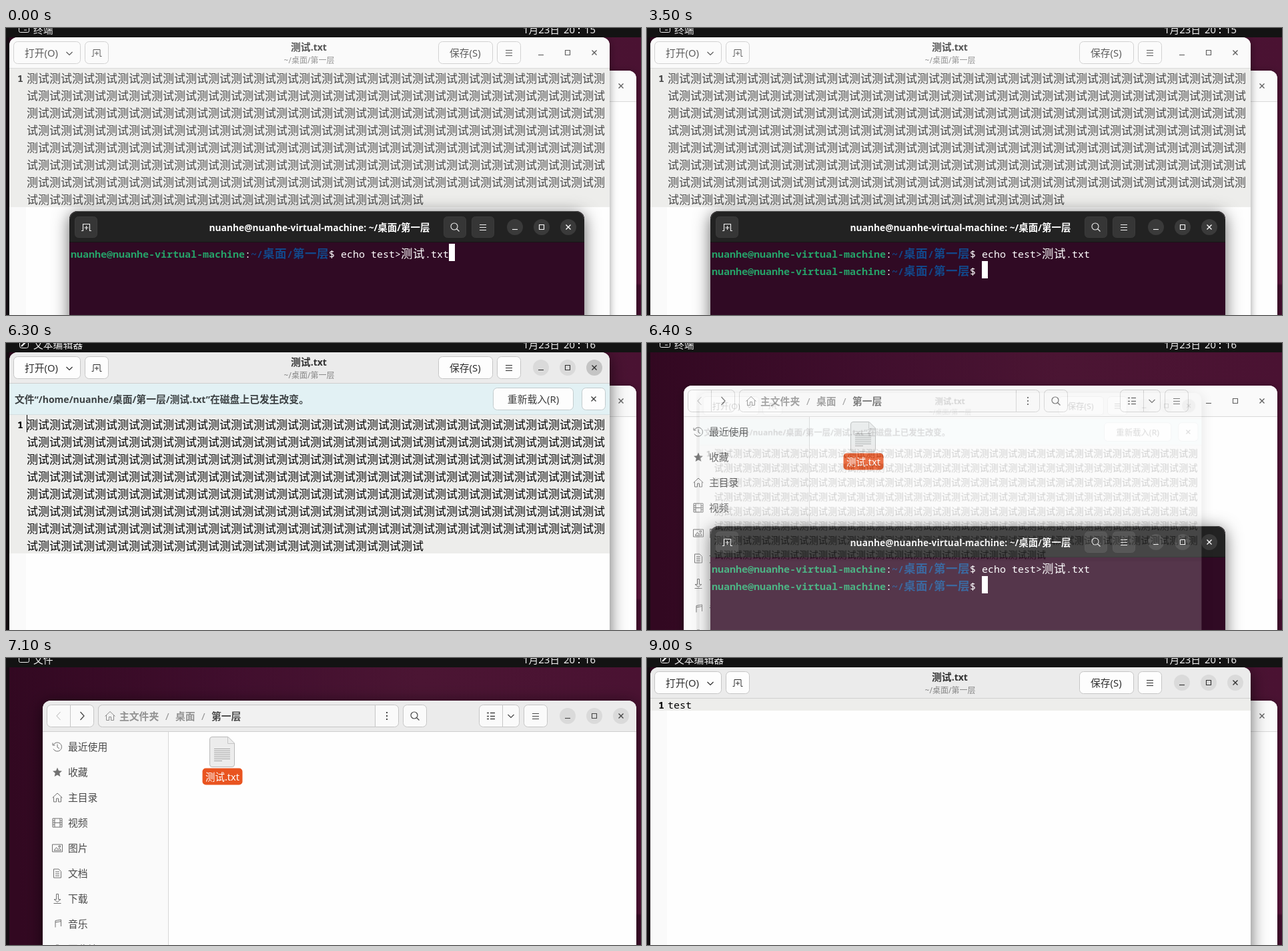
Write an HTML page with a canvas that moves like this. It is 952 by 431 pixels and loops after 9100 ms.

```html
<!DOCTYPE html>
<html lang="zh-CN">
<head>
<meta charset="utf-8">
<style>
html, body { margin: 0; width: 100%; height: 100%; overflow: hidden; background: #131313; }
canvas { display: block; }
</style>
</head>
<body>
<canvas id="stage" width="952" height="431"></canvas>
<script>
const LOOP = 9100;
const UI = 14.8;
const USER = 'nuanhe';
const HOST = USER + '@' + USER + '-virtual-machine';
const SANS = '"Noto Sans", "Noto Sans CJK SC", sans-serif';
const HAN = '"Noto Sans CJK SC", "Noto Sans CJK", sans-serif';
const MONO = '"Noto Sans Mono", "Noto Sans CJK SC", monospace';

const stage = document.getElementById('stage').getContext('2d');
const layer = document.createElement('canvas');
layer.width = 952;
layer.height = 800;
const layerCtx = layer.getContext('2d');
let c = stage;

const clamp = v => Math.max(0, Math.min(1, v));
const grey = v => `rgb(${v},${v},${v})`;
const mix = (a, b, p) => grey(Math.round(a + (b - a) * p));
const isHan = ch => /[\u3000-\u9fff\uff00-\uffef]/.test(ch);

// ---- text ----

function setFont(han, size, bold) {
  const latin = bold ? size * 0.95 : size;
  c.font = `${bold ? 'bold ' : ''}${han ? size : latin}px ${han ? HAN : SANS}`;
}

// Han and Latin runs have slightly different sizes.
function say(str, x, y, color, { size = UI, bold = false, center = false } = {}) {
  const runs = str.match(/[\u3000-\u9fff\uff00-\uffef]+|[^\u3000-\u9fff\uff00-\uffef]+/g);
  const widths = runs.map(r => {
    setFont(isHan(r[0]), size, bold);
    return c.measureText(r).width;
  });
  if (center) x -= widths.reduce((a, b) => a + b, 0) / 2;
  c.fillStyle = color;
  runs.forEach((r, i) => {
    setFont(isHan(r[0]), size, bold);
    c.fillText(r, x, y);
    x += widths[i];
  });
}

// Terminal grid: one cell is 9 px wide, a Han character takes two.
function cells(str, x, y, color, bold) {
  c.fillStyle = color;
  for (const ch of str) {
    const han = isHan(ch);
    c.font = `${bold ? 'bold ' : ''}${han ? 17.5 : 15}px ${han ? HAN : MONO}`;
    c.fillText(ch, x, y);
    x += han ? 18 : 9;
  }
  return x;
}

// ---- shapes ----

function rect(x, y, w, h, fill) {
  c.fillStyle = fill;
  c.fillRect(x, y, w, h);
}

function box(x0, y0, x1, y1, r, fill, border) {
  c.beginPath();
  c.roundRect(x0 + 0.5, y0 + 0.5, x1 - x0 - 1, y1 - y0 - 1, r);
  c.fillStyle = fill;
  c.fill();
  if (border) {
    c.strokeStyle = border;
    c.lineWidth = 1;
    c.stroke();
  }
}

function disc(x, y, r, fill) {
  c.beginPath();
  c.arc(x, y, r, 0, Math.PI * 2);
  c.fillStyle = fill;
  c.fill();
}

function icon(d, x, y, color, filled, width = 1) {
  c.save();
  c.translate(x, y);
  const p = new Path2D(d);
  if (filled) {
    c.fillStyle = color;
    c.fill(p);
  } else {
    c.strokeStyle = color;
    c.lineWidth = width;
    c.stroke(p);
  }
  c.restore();
}

const ICON = {
  tab: 'M-7 5.5H-4.5V-4.5H5.5V5.5H8M.5 -2V4M-2.5 1H3.5',
  menu: 'M-5 -3.5H5M-5 .5H5M-5 4.5H5',
  down: 'M-4.5 -2L0 2.5L4.5 -2',
  left: 'M2.5 -6L-3 0L2.5 6',
  right: 'M-2.5 -6L3 0L-2.5 6',
  search: 'M4 -1A5 5 0 1 1 -6 -1A5 5 0 1 1 4 -1M2.5 2.5L6.5 6.5',
  cross: 'M-3.5 -3.5L3.5 3.5M3.5 -3.5L-3.5 3.5',
  min: 'M-4 3.5H4',
  max: 'M-3.5 -3.5H3.5V3.5H-3.5Z',
  dots: 'M-1 -6H1V-4H-1ZM-1 -1H1V1H-1ZM-1 4H1V6H-1Z',
  list: 'M-6 -4.5H-3M-6 .5H-3M-6 4.5H-3M-1 -4.5H6M-1 .5H6M-1 4.5H6',
  home: 'M-7.5 .5L0 -6.5L7.5 .5M-5.5 -1V6.5H-1.5V1.5H1.5V6.5H5.5V-1',
  recent: 'M-6 -3A6.6 6.6 0 1 1 -6 3M-7 -6V-2.5H-3.5M0 -4V.5L3 2.5',
  star: 'M0 -7L2 -2.2L7 -1.8L3.2 1.6L4.4 6.6L0 4L-4.4 6.6L-3.2 1.6L-7 -1.8L-2 -2.2Z',
  film: 'M-7 -6.5H7V6.5H-7ZM-4 -6.5V6.5M4 -6.5V6.5M-4 0H4M-7 -3H-4M-7 0H-4M-7 3H-4M4 -3H7M4 0H7M4 3H7',
  image: 'M-7.5 -5.5H7.5V5.5H-7.5ZM-5 3.5L-1.5 -1L1 2L3 0L5.5 3.5ZM2 -3.5H4.5V-1.5H2Z',
  doc: 'M-5.5 -6.5H2L5.5 -3V6.5H-5.5ZM-3 -2.5H3M-3 .5H3M-3 3.5H3',
  load: 'M-1.5 -7V1H-5L0 5L5 1H1.5V-7ZM-5.5 7H5.5',
  note: 'M-3 5V-5L5.5 -6.5V3.5M-3 -2.5L5.5 -4',
  trash: 'M-5.5 -4.5H5.5M-4.5 -4.5V7H4.5V-4.5M-2 -4.5V-6.5H2V-4.5M-1.5 -2V5M1.5 -2V5'
};

function frame(x, y, w, h, fill, active) {
  c.save();
  c.shadowColor = active ? 'rgba(0,0,0,.6)' : 'rgba(0,0,0,.4)';
  c.shadowBlur = active ? 24 : 12;
  c.shadowOffsetY = active ? 4 : 2;
  c.beginPath();
  c.roundRect(x, y, w, h, [12, 12, 0, 0]);
  c.fillStyle = fill;
  c.fill();
  c.restore();
}

function controls(x, y, color, back, hover) {
  ['min', 'max', 'cross'].forEach((name, i) => {
    const cx = x + 40 * i;
    if (back) disc(cx, y, 12, hover && i === 2 ? '#c4c4c4' : back);
    icon(ICON[name], cx, y, color, false, name === 'cross' ? 1.4 : 1.1);
  });
}

// ---- windows ----

function desktop(app, minute) {
  const g = c.createLinearGradient(0, 60, 952, 0);
  g.addColorStop(0, '#320821');
  g.addColorStop(0.35, '#400e2d');
  g.addColorStop(0.65, '#4b1533');
  g.addColorStop(1, '#4a1232');
  rect(0, 0, 952, 431, g);
  const v = c.createLinearGradient(0, 64, 0, 431);
  v.addColorStop(0, 'rgba(104,22,68,0)');
  v.addColorStop(0.75, 'rgba(104,22,68,.55)');
  v.addColorStop(0.87, 'rgba(104,22,68,.55)');
  v.addColorStop(0.88, 'rgba(60,6,42,.5)');
  v.addColorStop(1, 'rgba(60,6,42,.3)');
  rect(930, 64, 22, 367, v);
  rect(0, 14, 5, 417, '#160d13');
}

function panel(app, minute) {
  const white = '#f0f0f0';
  rect(0, 0, 952, 14, '#131313');
  if (app === '文本编辑器') {
    box(20, -6, 34, 8, 3, '#131313', white);
    icon('M-4 3L4 -5', 27, 2, white, false, 2.4);
  } else {
    box(19, -6, 35, 7, 2, '#131313', white);
    if (app === '终端') icon('M0 0H4', 27, 3, white);
  }
  say(app, 41, 8, white);
  say('1月23日', 775, 8, white);
  say('20', 836, 8, white);
  rect(858, 0, 2, 2, white);
  rect(858, 6, 2, 2, white);
  say(String(minute), 867, 8, white);
}

function editor({ focus, bar, body, caret, hover }) {
  const active = focus > 0;
  const ink = mix(92, 46, focus);
  const edge = active ? '#c6c6c6' : '#d2d2d2';
  const face = active ? '#fdfdfd' : '#fbfbfb';
  frame(5, 14, 900, 746, '#fefefe', active);
  c.beginPath();
  c.roundRect(5, 14, 900, 46, [12, 12, 0, 0]);
  c.fillStyle = active ? '#ebebeb' : '#fafafa';
  c.fill();
  rect(5, 60, 900, 1, active ? '#cfcfcf' : '#dadada');

  box(11, 20, 112, 54, 6, face, edge);
  say('打开(O)', 28, 43, ink);
  icon(ICON.down, 95, 38, ink, false, 1.2);
  box(118, 20, 154, 54, 6, face, edge);
  icon(ICON.tab, 135.5, 37, ink);
  say('测试.txt', 454, 34, mix(85, 50, focus), { bold: true, center: true });
  say('~/桌面/第一层', 454.5, 53, mix(150, 135, focus), { size: 12, center: true });
  box(648, 20, 730, 54, 6, face, edge);
  say('保存(S)', 665, 43, ink);
  box(736, 20, 772, 54, 6, face, edge);
  icon(ICON.menu, 754, 37, ink);
  controls(802, 37, ink, active && '#dadada', hover);

  let top = 61;
  if (bar) {
    rect(5, 61, 900, 46, '#e2f1f4');
    rect(5, 107, 900, 1, '#d4dfe1');
    say(`文件“/home/${USER}/桌面/第一层/测试.txt”在磁盘上已发生改变。`, 13, 90, '#3c4143', { bold: true });
    box(730, 67, 851, 101, 6, '#fdfdfd', '#c2cbcd');
    say('重新载入(R)', 790.5, 90, '#3c3c3c', { center: true });
    box(863, 67, 899, 101, 6, '#fdfdfd', '#c2cbcd');
    icon(ICON.cross, 881, 84, '#3c3c3c', false, 1.4);
    top = 108;
  }

  rect(5, top, 25, 760 - top, '#fafafa');
  const long = body === 'long';
  rect(5, top, 900, long ? 208 : 18, '#ededeb');
  const text = active ? '#000' : '#484848';
  cells('1', 17, top + (long ? 20 : 15), text, true);
  if (long) {
    c.fillStyle = text;
    c.font = `17px ${HAN}`;
    for (let row = 0; row < 8; row++) {
      const n = row < 7 ? 51 : 35;
      const pair = row % 2 ? '试测' : '测试';
      c.fillText(pair.repeat(26).slice(0, n), 31, top + 21 + row * 26);
    }
  } else {
    cells('test', 31, top + 15, text);
  }
  if (caret) rect(31, top, 1, long ? 26 : 18, '#000');
}

function prompt(y) {
  let x = cells(HOST, 97, y, '#26a269', true);
  x = cells(':', x, y, '#fff');
  x = cells('~/桌面/第一层', x, y, '#12488b', true);
  return cells('$ ', x, y, '#fff');
}

function terminal(done, cursor) {
  frame(95, 275, 772, 500, '#300a24', true);
  c.beginPath();
  c.roundRect(95, 275, 772, 47, [12, 12, 0, 0]);
  c.fillStyle = '#222';
  c.fill();
  c.save();
  c.beginPath();
  c.rect(95, 275, 772, 12);
  c.clip();
  c.beginPath();
  c.roundRect(95.5, 275.5, 771, 60, 12);
  c.strokeStyle = '#464646';
  c.lineWidth = 1;
  c.stroke();
  c.restore();
  rect(95, 321, 772, 1, '#161616');

  [[103, ICON.tab], [656, ICON.search], [698, ICON.menu]].forEach(([x, d]) => {
    box(x, 283, x + 34, 315, 5, '#363636', '#3b3b3b');
    icon(d, x + 17, 299, '#f2f2f2', false, 1.1);
  });
  say(`${HOST}: ~/桌面/第一层`, 470, 305, '#fff', { size: 14.5, bold: true, center: true });
  controls(763, 299, '#fff', '#3a3a3a');

  let x = prompt(345);
  x = cells('echo test>测试.txt', x, 345, '#fff');
  let y = 324;
  if (done) {
    x = prompt(371);
    y = 350;
  }
  if (cursor) rect(x, y, 9, 26, '#fff');
}

const PLACES = [
  ['recent', '最近使用'], ['star', '收藏'], ['home', '主目录'],
  ['film', '视频'], ['image', '图片'], ['doc', '文档'],
  ['load', '下载'], ['note', '音乐'], ['trash', '回收站']
];

function files(focus) {
  const active = focus > 0;
  const ink = mix(95, 52, focus);
  const edge = active ? '#c6c6c6' : '#d2d2d2';
  const face = active ? '#fafafa' : '#fbfbfb';
  frame(55, 64, 890, 700, '#fefefe', active);
  c.beginPath();
  c.roundRect(55, 64, 890, 46, [12, 12, 0, 0]);
  c.fillStyle = active ? '#ebebeb' : '#fafafa';
  c.fill();
  rect(55, 111, 188, 400, '#fafafa');
  rect(243, 111, 1, 400, '#d8d8d8');
  rect(55, 110, 890, 1, active ? '#cfcfcf' : '#dadada');

  box(61, 70, 132, 104, 6, face, edge);
  rect(96, 71, 1, 32, edge);
  icon(ICON.left, 79, 87, '#c4c4c4', false, 1.1);
  icon(ICON.right, 114, 87, ink, false, 1.3);
  box(138, 70, 589, 104, 6, face, edge);
  if (active) box(138, 70, 554, 104, [6, 0, 0, 6], '#f1f1f1', edge);
  rect(553, 71, 1, 32, edge);
  icon(ICON.home, 156, 87, '#8c8c8c');
  say('主文件夹', 170, 93, '#929292', { bold: true });
  say('/', 239, 93, '#929292');
  say('桌面', 254, 93, '#929292', { bold: true });
  say('/', 293, 93, '#929292');
  say('第一层', 308, 93, mix(100, 58, focus), { bold: true });
  icon(ICON.dots, 571, 87, ink, true);
  box(595, 70, 631, 104, 6, face, edge);
  icon(ICON.search, 613, 87, ink, false, 1.2);
  box(709, 70, 770, 104, 6, face, edge);
  rect(744, 71, 1, 32, edge);
  icon(ICON.list, 727, 87, ink, false, 1.4);
  icon(ICON.down, 757, 87, ink, false, 1.2);
  box(776, 70, 812, 104, 6, face, edge);
  icon(ICON.menu, 794, 87, ink);
  controls(842, 87, ink, active && '#dadada');

  PLACES.forEach(([name, label], i) => {
    const y = 134 + 38 * i;
    icon(ICON[name], 77, y - 0.5, mix(125, 105, focus), name === 'star');
    say(label, 93, y + 5, mix(85, 65, focus));
  });

  icon('M309 118.5H333L342.5 128V160Q342.5 163.5 339 163.5H309Q305.5 163.5 305.5 160V122Q305.5 118.5 309 118.5Z', 0, 0, '#ececec', true);
  icon('M309 118.5H333L342.5 128V160Q342.5 163.5 339 163.5H309Q305.5 163.5 305.5 160V122Q305.5 118.5 309 118.5Z', 0, 0, '#b9b9b9');
  icon('M332.5 118.5V128.5H342.5', 0, 0, '#c6c6c6');
  for (let i = 0; i < 7; i++) rect(312, 136 + i * 3, i === 6 ? 12 : 24, 1, '#a2a2a2');
  box(294, 165, 355, 191, 5, '#e95420');
  say('测试.txt', 324.5, 184, '#fff', { center: true, size: 14.5 });
}

// Draws the editor as one flat layer, scaled about a pivot.
function fadeEditor(state, px, py, sx, sy, alpha) {
  layerCtx.clearRect(0, 0, layer.width, layer.height);
  c = layerCtx;
  editor(state);
  c = stage;
  c.save();
  c.globalAlpha = alpha;
  c.translate(px, py);
  c.scale(sx, sy);
  c.drawImage(layer, -px, -py);
  c.restore();
}

// ---- timeline ----

const RAISE = 4800, CLOSE = 6315, FILES = 7100, OPEN = 7475, FADE = 150;
const TOGGLES = [400, 1000, 1900, 2400, 3000, 3500, 4100, 4600, 6900];
const inside = (t, a, b) => t >= a && t < b;

function draw(t) {
  c = stage;
  c.clearRect(0, 0, 952, 431);
  desktop();
  const cursor = TOGGLES.filter(x => t >= x).length % 2 === 0;
  const done = t >= 1400;
  let app = '终端';

  if (t < RAISE) {
    files(0);
    editor({ focus: 0, body: 'long' });
    terminal(done, cursor);
  } else if (t < FILES) {
    files(0);
    terminal(true, cursor);
    const state = {
      focus: clamp(0.5 + (t - RAISE) / 400),
      bar: true,
      body: 'long',
      caret: !inside(t, 5600, 6000),
      hover: t >= 6100
    };
    if (t < CLOSE) {
      app = '文本编辑器';
      editor(state);
    } else if (t < CLOSE + FADE) {
      const k = (t - CLOSE) / FADE;
      const p = 1 - (1 - k) ** 2;
      const s = 1 - 0.2 * p;
      fadeEditor({ ...state, caret: false }, 455, 387, s, s, 1 - p);
    }
  } else if (t < OPEN) {
    app = '文件';
    files(clamp(0.6 + (t - FILES) / 400));
  } else {
    app = '文本编辑器';
    files(0);
    const state = {
      focus: 1,
      body: 'short',
      caret: !inside(t, 7900, 8300) && t < 9000
    };
    const k = (t - OPEN) / FADE;
    if (k < 1) {
      const p = 1 - 2 ** (-10 * k);
      fadeEditor(state, 455, 760, 0.01 + 0.99 * p, 0.05 + 0.95 * p, p);
    } else {
      editor(state);
    }
  }
  panel(app, t < 6000 ? 15 : 16);
}

const start = performance.now();
function tick(now) {
  draw(Math.max(0, now - start) % LOOP);
  requestAnimationFrame(tick);
}
draw(0);
requestAnimationFrame(tick);
</script>
</body>
</html>
```
